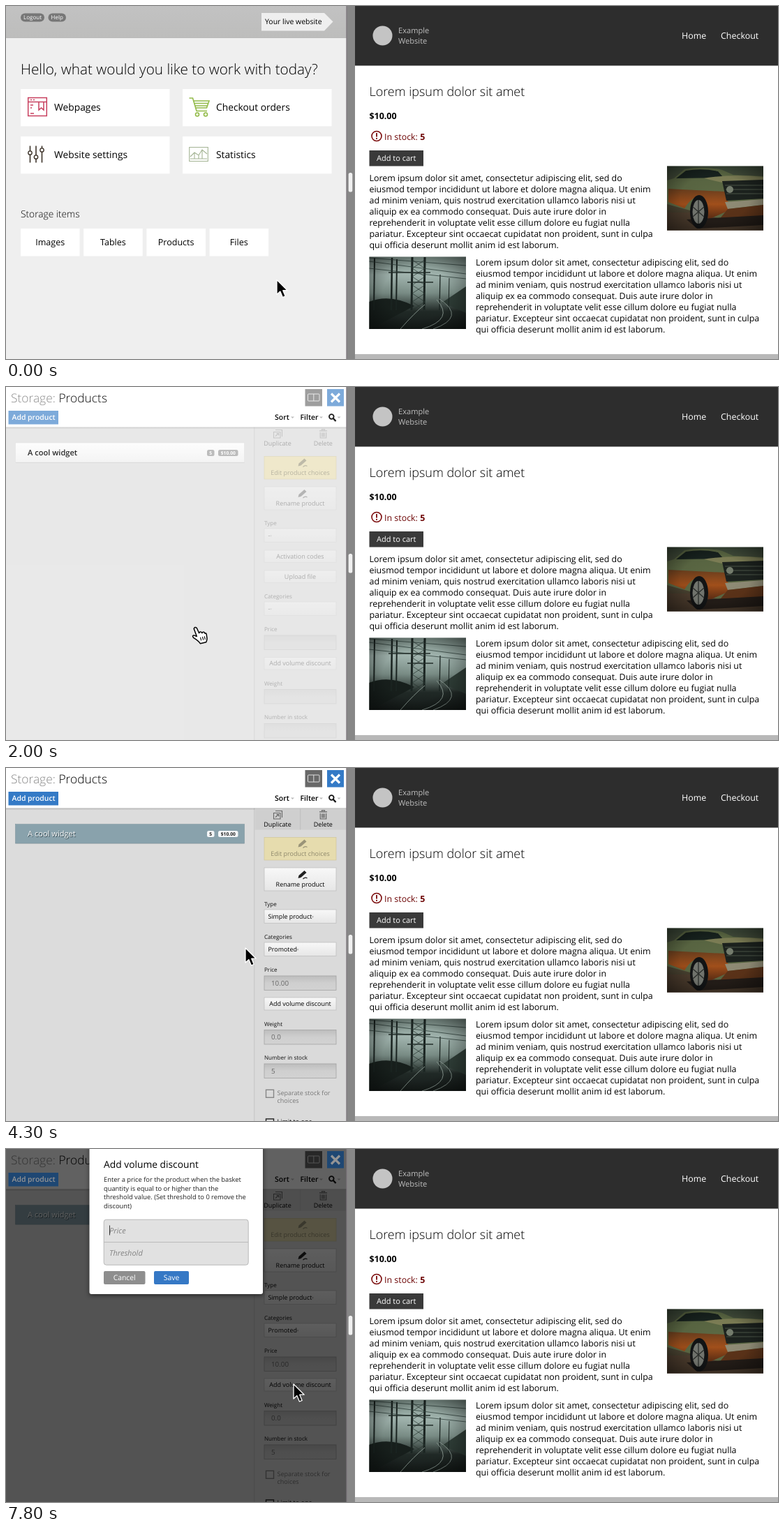
Write an HTML page that moves like this. It is 1106x506 px and loops after 8000 ms.

```html
<!DOCTYPE html>
<html lang="en">
<head>
<meta charset="utf-8">
<title>Volume discount demo</title>
<style>
html, body { margin: 0; width: 100%; height: 100%; overflow: hidden; background: #fff; }
svg { display: block; width: 100vw; height: 100vh; }
text { font-family: "Open Sans", "Noto Sans", sans-serif; text-rendering: geometricPrecision; white-space: pre; }
</style>
</head>
<body>
<svg id="stage" viewBox="0 0 1106 506" xmlns="http://www.w3.org/2000/svg"></svg>
<script>
const LOOP = 8000;
const stage = document.getElementById('stage');

// Markup helpers
const rect = (x, y, w, h, fill, more = '') =>
  `<rect x="${x}" y="${y}" width="${w}" height="${h}" fill="${fill}" ${more}/>`;
const text = (x, y, str, size, more = '') =>
  `<text x="${x}" y="${y}" font-size="${size}" ${more}>${str}</text>`;
const mid = (x, y, str, size, more = '') => text(x, y, str, size, 'text-anchor="middle" ' + more);
const line = (d, stroke, width, more = '') =>
  `<path d="${d}" fill="none" stroke="${stroke}" stroke-width="${width}" ${more}/>`;
const shape = (d, fill, more = '') => `<path d="${d}" fill="${fill}" ${more}/>`;
const group = (id, body, more = '') => `<g id="${id}" ${more}>${body}</g>`;
const lines = (x, y, step, size, rows, more = '') =>
  rows.map((row, i) => text(x, y + i * step, row, size, more)).join('');
const stops = colors => colors.map((c, i) => `<stop offset="${i / (colors.length - 1)}" stop-color="${c}"/>`).join('');
const gradient = (id, ...colors) =>
  `<linearGradient id="${id}" x1="0" y1="0" x2="0" y2="1">${stops(colors)}</linearGradient>`;

const LIGHT = 'font-weight="300"', SEMI = 'font-weight="600"', BOLD = 'font-weight="700"';
const LOREM = ['Lorem ipsum dolor sit amet, consectetur adipiscing elit, sed do',
  'eiusmod tempor incididunt ut labore et dolore magna aliqua. Ut enim',
  'ad minim veniam, quis nostrud exercitation ullamco laboris nisi ut',
  'aliquip ex ea commodo consequat. Duis aute irure dolor in',
  'reprehenderit in voluptate velit esse cillum dolore eu fugiat nulla',
  'pariatur. Excepteur sint occaecat cupidatat non proident, sunt in culpa',
  'qui officia deserunt mollit anim id est laborum.'];

const defs = '<defs>' +
  gradient('bar', '#c2c2c2', '#bdbdbc') +
  gradient('button', '#f8f8f8', '#e6e6e6') +
  gradient('row', '#fdfdfd', '#eeeeee') +
  gradient('field', '#bdbdbd', '#cfcfcf', '#d2d2d2') +
  gradient('shade', '#00000030', '#00000000') +
  gradient('sky', '#42513f', '#4b4a36', '#403024') +
  gradient('paint', '#6b3f1e', '#a3501b', '#5a2c14') +
  gradient('fog', '#82978f', '#a9bdb7', '#7b8e87', '#222b28', '#161c1a') +
  `<radialGradient id="vignette" r=".72">${stops(['#00000000', '#00000010', '#00000090'])}</radialGradient>` +
  '<clipPath id="carClip"><rect x="947" y="229.500" width="138" height="92"/></clipPath>' +
  '<clipPath id="railClip"><rect x="520.500" y="359.500" width="138.500" height="103.500"/></clipPath>' +
  '<clipPath id="left"><rect width="488" height="506"/></clipPath>' +
  '<filter id="soft" x="-20%" y="-20%" width="140%" height="140%"><feGaussianBlur stdDeviation="3"/></filter>' +
  '</defs>';

function carPhoto() {
  return '<g clip-path="url(#carClip)">' + rect(947, 229, 138, 93, 'url(#sky)') +
    shape('M947 296H1085V322H947Z', '#4d3d2e') +
    shape('M947 250L957 247L972 234Q1000 229 1026 235L1042 242L1085 244V300L1020 304L947 284Z', '#5d6a45') +
    shape('M960 247L974 236Q998 232 1020 237L1028 246Z', '#18231f') +
    shape('M1000 247Q1040 240 1085 245V251L1030 254Z', '#818258') +
    shape('M949 262L1030 266L1038 292L1006 306L1003 283Q990 262 972 290L949 281Z', 'url(#paint)') +
    shape('M1026 251L1085 249V276L1032 279Z', '#1d231f') +
    line('M1030 257H1085M1031 263H1085M1032 269H1085', '#4d5749', 1) +
    shape('M1030 281L1085 277V285L1034 291Z', '#938f78') +
    shape('M1034 291L1085 285V304L1020 308Z', '#5e3419') +
    shape('M975 306L1085 300V314L990 319Z', '#241d18') +
    '<ellipse cx="993" cy="295" rx="13" ry="24" fill="#121415"/>' +
    '<ellipse cx="992" cy="295" rx="8.500" ry="17" fill="#767972"/>' +
    line('M992 278V312M984 288L1000 302M984 302L1000 288', '#2d302d', 1.3) +
    '<circle cx="1037" cy="263" r="5" fill="#788070"/>' +
    rect(947, 229, 138, 93, 'url(#vignette)') + '</g>';
}

function railPhoto() {
  let out = rect(520, 359, 140, 105, 'url(#fog)') +
    shape('M520 424Q550 412 585 430L520 464Z', '#18201d') +
    shape('M625 425L659 402V440Z', '#2e3c36');
  for (const [x, top, w] of [[528, 361, 2], [553, 361, 2.5], [560, 363, 2], [582, 360, 3], [600, 360, 3], [622, 385, 1.3], [635, 390, 1]])
    out += line(`M${x} ${top}L${x - 1} 436`, '#1b2522', w);
  for (let i = 0; i < 6; i++)
    out += line(`M582 ${364 + i * 12}L600 ${376 + i * 12}M600 ${364 + i * 12}L582 ${376 + i * 12}`, '#283630', 0.7);
  for (const [a, b] of [[366, 384], [376, 391], [361, 372]])
    out += line(`M520 ${a}L659 ${b}`, '#33443f', 0.8);
  out += line('M548 382H608M575 396H612', '#24302c', 1.5) +
    line('M596 463Q643 449 617 421M612 463Q660 446 621 420M565 463Q585 440 600 428', '#87968f', 1) +
    rect(520, 359, 140, 105, 'url(#vignette)');
  return `<g clip-path="url(#railClip)">${out}</g>`;
}

function livePage() {
  const size = 12.45;
  return rect(500, 0, 606, 506, '#fff') + rect(500, 0, 606, 85.5, '#2d2d2d') +
    '<circle cx="539.500" cy="42.500" r="14" fill="#c4c4c4"/>' +
    lines(562, 39, 15, 11.1, ['Example', 'Website'], 'fill="#bdbdbd"') +
    text(968, 46.5, 'Home', size, 'fill="#fff"') + text(1024, 46.5, 'Checkout', size, 'fill="#fff"') +
    text(520.5, 129, 'Lorem ipsum dolor sit amet', 17.97, LIGHT) +
    text(520.5, 161.7, '$10.00', size, BOLD) +
    '<circle cx="531" cy="186.500" r="7" fill="none" stroke="#7a0a0a" stroke-width="1.600"/>' +
    rect(530.1, 182, 1.8, 5.6, '#7a0a0a') + rect(530.1, 189, 1.8, 1.9, '#7a0a0a') +
    text(542, 191.5, `In stock: <tspan ${BOLD}>5</tspan>`, size, 'fill="#6d0505"') +
    rect(520.5, 207, 77.5, 22.5, '#3a3a3a') + text(531, 222.2, 'Add to cart', 11, 'fill="#fff"') +
    lines(520.5, 250.8, 16, size, LOREM) + lines(673, 371.7, 16, size, LOREM) +
    carPhoto() + railPhoto() + rect(500, 499, 606, 7, '#b8b8b8');
}

function homePage() {
  const red = '#c8405f', green = '#93bb49', pale = '#a4b494', brown = '#33291f';
  let out = rect(0, 0, 488, 506, '#efefef') + rect(0, 0, 488, 45.5, 'url(#bar)') +
    rect(0, 45, 488, 0.8, '#b2b2b2') +
    rect(21, 10.5, 34, 12, '#777', 'rx="6"') + rect(60.5, 10.5, 25.5, 12, '#777', 'rx="6"') +
    mid(38, 19.4, 'Logout', 8, 'fill="#fff"') + mid(73.2, 19.4, 'Help', 8, 'fill="#fff"') +
    shape('M366 10H456L468.500 22.500L456 35.500H366Z', '#efefef') +
    text(371, 26, 'Your live website', 10.45) +
    text(21, 98, 'Hello, what would you like to work with today?', 20.75, LIGHT) +
    text(21, 302.7, 'Storage items', 13.75, LIGHT);
  const cards = [[21, 119, 'Webpages'], [253, 119, 'Checkout orders'], [21, 187, 'Website settings'], [253, 187, 'Statistics']];
  for (const [x, y, name] of cards)
    out += rect(x, y, 213.5, 53.3, '#fff') + text(x + 48, y + 31.2, name, 13.8);
  ['Images', 'Tables', 'Products', 'Files'].forEach((name, i) => {
    const x = 21 + i * 90.2;
    out += rect(x, 319, 84.5, 39.5, '#fff') + mid(x + 42.2, 343.4, name, 12.55);
  });
  return out +
    line('M31.700 131.500H58.300V157.500H31.700ZM32 137.500H58M35 134.500H37M39 134.500H41M47 138V149L50.500 146L54 149V138M35 142H39M35 146H37M35 154H40', red, 1.5) +
    line('M262.500 132H267.500L273 150.500H288M268.500 136H291L287.500 146H271.500M269.500 139.500H289M270.500 143H288', green, 1.6) +
    `<g fill="none" stroke="${green}" stroke-width="1.600"><circle cx="274" cy="155.500" r="2.500"/><circle cx="286" cy="155.500" r="2.500"/></g>` +
    line('M34.500 200.500V208M34.500 213V224.500M43 200.500V214M43 219V224.500M51.500 200.500V204M51.500 209V224.500', brown, 1.5) +
    [[34.5, 210.5], [43, 216.5], [51.5, 206.5]].map(([x, y]) =>
      `<circle cx="${x}" cy="${y}" r="2.700" fill="#fff" stroke="${brown}" stroke-width="1.300"/>`).join('') +
    line('M262.700 202.500H289.300V222.500H262.700ZM264 216L270 210L276 214L281 206L288 212M264 219H288M270 211V219M276 214V219M281 207V219', pale, 1.1);
}

const pencil = (x, y) =>
  shape(`M${x - 6} ${y + 5}L${x - 5} ${y + 1}L${x + 3} ${y - 6}L${x + 6} ${y - 3}L${x - 2} ${y + 4}Z`, '#222') +
  line(`M${x + 1} ${y + 6}Q${x + 4} ${y + 3} ${x + 7} ${y + 5}`, '#222', 1.2);
const button = (y, h, name, base) =>
  rect(370, y, 103, h, 'url(#button)', 'stroke="#bbb" stroke-width=".7"') + mid(421.5, base, name, 9);
const label = (y, name) => text(370, y, name, 8.05, 'fill="#111"');
const select = (y, value) => rect(370, y, 103, 19.5, 'url(#button)', 'stroke="#bbb" stroke-width=".7"') +
  text(375.5, y + 13, `${value}<tspan font-size="5" fill="#999" dy="-1">▾</tspan>`, 8.9);
const field = (y, value) => rect(370, y, 103, 20.5, 'url(#field)', 'stroke="#a3a3a3" stroke-width=".8"') +
  text(380, y + 13.8, value, 9.8, 'fill="#666"');

function tools() {
  return line('M383.500 64.500H393V73H383.500ZM386 61.500H395.500V71M386 70.500L390.500 66.500M387.500 66.500H390.700V69.500', '#666', 1.1) +
    line('M449 62.800H460M452.500 62V60.800H456.500V62M450.300 65V73H458.700V65M452.700 65.500V71.500M454.500 65.500V71.500M456.300 65.500V71.500', '#666', 1.2) +
    mid(389, 83.8, 'Duplicate', 9) + mid(454.3, 83.8, 'Delete', 9) +
    button(143, 33, 'Rename product', 170) + pencil(424.5, 153);
}

const checkbox = y => rect(372.5, y, 11, 11, 'none', 'stroke="#222" stroke-width="1.400"');

const idlePanel = () => tools() + label(198, 'Type') + select(203, '-') +
  button(234, 17.5, 'Activation codes', 245.8) + button(263, 17.5, 'Upload file', 274.8) +
  label(303, 'Categories') + select(308, '-') + label(350, 'Price') + field(356, '') +
  button(387.5, 17.5, 'Add volume discount', 399.3) + label(427.8, 'Weight') + field(433.5, '') +
  label(476, 'Number in stock') + field(482.5, '');

const activePanel = () => rect(356.5, 58.5, 131, 30, '#cfcfcf') + rect(421.3, 58.5, 0.8, 30, '#bbb') + tools() +
  label(198, 'Type') + select(203, 'Simple product') + label(245, 'Categories') + select(250, 'Promoted') +
  label(292, 'Price') + field(298, '10.00') + button(329, 18, 'Add volume discount', 341.3) +
  label(369.7, 'Weight') + field(375.5, '0.0') + label(418, 'Number in stock') + field(424, '5') +
  `<g opacity=".45">${checkbox(461.3)}${lines(388.5, 469.4, 11, 9, ['Separate stock for', 'choices'])}</g>` +
  checkbox(503) + text(388.5, 510, 'Limit to one', 9);

const badges = (fill, ink) => rect(288, 90, 10.5, 9, fill, 'rx="2.500"') + rect(304, 90, 28.5, 9, fill, 'rx="2.500"') +
  mid(293.2, 96.9, '5', 6.7, `${BOLD} fill="${ink}"`) + mid(318.3, 96.9, '$10.00', 6.7, `${BOLD} fill="${ink}"`);

function productPage() {
  return rect(0, 0, 488, 506, '#dcdcdc') + rect(356, 57, 132, 449, '#dadada') + rect(355.3, 57, 0.9, 449, '#c0c0c0') +
    rect(0, 0, 488, 57.5, '#fff') + rect(0, 57.5, 488, 3, 'url(#shade)') +
    rect(14, 107, 327.5, 2, '#00000018') + rect(13.5, 80, 328, 28, 'url(#row)', 'stroke="#d0d0d0" stroke-width=".5"') +
    badges('#969696', '#fff') +
    rect(370, 99.5, 103, 32.5, '#e6dcae', 'stroke="#d0c69a" stroke-width=".7"') +
    `<g opacity=".38">${pencil(424.5, 108.5)}${mid(421.5, 126, 'Edit product choices', 9)}</g>` +
    group('idle', idlePanel(), 'opacity=".42"') + group('active', activePanel()) +
    rect(428.5, 3, 24.5, 24.5, '#686868') + rect(432.5, 10, 16.5, 10, 'none', 'stroke="#ddd" stroke-width="1" rx="1"') +
    rect(440.3, 10, 1, 10, '#ddd');
}

const productInk = () =>
  text(7, 21.7, '<tspan fill="#888">Storage:</tspan> Products', 17.4, LIGHT) +
  text(385, 47, 'Sort', 10.5, SEMI) + text(421.5, 47, 'Filter', 10.5, SEMI) +
  shape('M408 42.500H413L410.500 45ZM449 42.500H454L451.500 45ZM474.500 42.500H479.500L477 45Z', '#bbb') +
  '<circle cx="466.300" cy="42.500" r="3.300" fill="none" stroke="#111" stroke-width="1.800"/>' +
  line('M468.800 45L472.500 49', '#111', 2.3) +
  group('plainName', text(31, 98, 'A cool widget', 11.1, SEMI + ' fill="#222"')) +
  group('picked', rect(13.5, 80.5, 328, 27.5, '#89a2ac', 'id="pickedRow" stroke="#7e949d" stroke-width=".6"') +
    text(31.8, 99, 'A cool widget', 11.1, 'font-weight="500" fill="#2e4148"') +
    text(31, 98, 'A cool widget', 11.1, 'font-weight="500" fill="#fff"') + badges('#f4f6f7', '#222'));

const blueButtons = () => rect(3.5, 34, 71.5, 19.5, '#347ac6') +
  text(8.5, 47.3, 'Add product', 10.45, SEMI + ' fill="#fff"') +
  rect(460, 3, 24, 24.5, '#347ac6') + line('M466 9.500L478 21.500M478 9.500L466 21.500', '#fff', 3.2);

function dialog() {
  const hint = 'font-style="italic" fill="#858585"';
  return rect(119.5, -10, 249, 220, '#000', 'opacity=".5" filter="url(#soft)"') +
    rect(119.5, -6, 248.5, 214, '#fff', 'rx="3"') + text(140, 26.7, 'Add volume discount', 13.8) +
    lines(140, 47.3, 12.45, 9.32, ['Enter a price for the product when the basket', 'quantity is equal to or higher than the',
      'threshold value. (Set threshold to 0 remove the', 'discount)'], 'fill="#222"') +
    rect(140.2, 101.2, 207, 65, '#e1e1e1', 'rx="3.500" stroke="#b3b3b3" stroke-width=".9"') + rect(140, 133.2, 207, 0.9, '#b5b5b5') +
    text(148, 120.7, 'Price', 11, hint) + text(148, 153, 'Threshold', 11, hint) +
    rect(148, 109.5, 0.9, 14, '#222', 'id="caret"') +
    rect(140, 175, 59.5, 19, '#8e8e8e', 'rx="2"') + rect(212, 175, 50, 19, '#3578c5', 'rx="2"') +
    mid(169.7, 188.2, 'Cancel', 10.4, 'fill="#fff"') + mid(237, 188.2, 'Save', 10.4, 'fill="#fff"');
}

const pointer = () => group('arrow', shape('M0 0V20L4.600 15.800L8 23.800L11.600 22.300L8.300 14.500H14.500Z', '#000',
    'stroke="#fff" stroke-width="1.200" stroke-linejoin="round" transform="scale(1.050)"')) +
  group('hand', '<g transform="translate(-1 -.700)">' +
    shape('M-3.800 2.200Q-2.500 -1.200 .300 1.200L3.600 8.500Q4.500 6 6.500 6.800Q7.600 7.200 7.900 8.400Q9 6.300 10.700 7.200Q11.900 7.700 12.100 9Q13.600 7.800 14.200 10.200L15 16Q15 19 13.800 21.500L5.500 23.500Q3 19.500 -4.500 15Q-6.800 12 -3.800 11.600L.300 13.200Z',
      '#fff', 'stroke="#000" stroke-width="1.500" stroke-linejoin="round"') +
    line('M5.500 14.500L6.700 19M8.500 13.700L9.700 18.300M11.300 13L12.300 17.500', '#000', 1.1) + '</g>');

stage.innerHTML = defs + '<g clip-path="url(#left)">' + rect(0, 0, 488, 506, '#fff') +
  group('home', homePage()) + group('products', productPage()) + group('ink', productInk()) +
  rect(0, 0, 488, 506, '#000', 'id="dim"') + group('blue', blueButtons()) + group('dialog', dialog()) + '</g>' +
  livePage() + rect(487.7, 0, 12.3, 506, '#878787') + rect(487.5, 0, 0.8, 506, '#756b75') +
  rect(490.7, 239, 5.6, 27.5, '#f0f0f0', 'rx="2.600"') +
  '<circle id="ring" fill="none" stroke="#c43a3a"/>' + group('cursor', pointer());

// Motion
const $ = id => document.getElementById(id);
const clamp = v => Math.max(0, Math.min(1, v));
const ramp = (t, a, b) => clamp((t - a) / (b - a));
const ease = u => u * u * (3 - 2 * u);
const show = (id, on) => $(id).setAttribute('opacity', on === true ? 1 : on || 0);

// time, x, y
const PATH = [[0, 388, 392.5], [700, 274, 345], [2000, 274, 345], [2900, 190, 97], [3800, 189, 97],
  [4300, 343, 258], [4600, 343, 258], [5300, 412, 342], [5400, 412, 342], [5700, 412, 337], [LOOP, 412, 337]];
// start, x, y
const CLICKS = [[1100, 275, 343.5], [3180, 189, 99], [6100, 412, 338]];
const HANDS = [[500, 2100], [5100, 5650]];

function cursorAt(t) {
  const i = PATH.findIndex(p => p[0] > t);
  const [t0, x0, y0] = PATH[i - 1], [t1, x1, y1] = PATH[i];
  const u = ease(ramp(t, t0, t1));
  return [x0 + (x1 - x0) * u, y0 + (y1 - y0) * u];
}

function drawRing(t) {
  const click = CLICKS.find(c => t >= c[0] - 100 && t < c[0] + 660);
  show('ring', !!click);
  if (!click) return;
  const age = Math.max(0, t - click[0]), r = 5 + 0.077 * age, ring = $('ring');
  ring.setAttribute('cx', click[1]);
  ring.setAttribute('cy', click[2]);
  ring.setAttribute('r', r);
  ring.setAttribute('stroke-width', 1 + r * 0.17);
  ring.setAttribute('opacity', clamp((660 - age) / 320));
}

function draw(t) {
  const arrive = ramp(t, 1620, 2220);
  show('home', 1 - ramp(t, 1350, 1600));
  show('products', arrive);
  show('blue', arrive);
  show('ink', ramp(t, 1600, 2020));

  const picked = t >= 3500;
  show('picked', picked);
  show('plainName', !picked);
  const mix = ramp(t, 3600, 3900);
  $('pickedRow').setAttribute('fill', `rgb(${119 + 18 * mix},${150 + 12 * mix},${162 + 10 * mix})`);
  show('active', t >= 3800);
  show('idle', t < 3800 && 0.42);

  const modal = ramp(t, 6620, 6790);
  show('dim', modal * 0.62);
  show('dialog', modal);
  $('blue').style.filter = modal ? `brightness(${1 - 0.42 * modal})` : '';
  show('caret', t < 7200 || t >= 7700);

  const [x, y] = cursorAt(t);
  $('cursor').setAttribute('transform', `translate(${x} ${y})`);
  const hand = HANDS.some(([a, b]) => t >= a && t < b);
  show('hand', hand);
  show('arrow', !hand);
  drawRing(t);
}

const start = performance.now();
function tick() {
  draw((performance.now() - start) % LOOP);
  requestAnimationFrame(tick);
}
tick();
</script>
</body>
</html>
```
